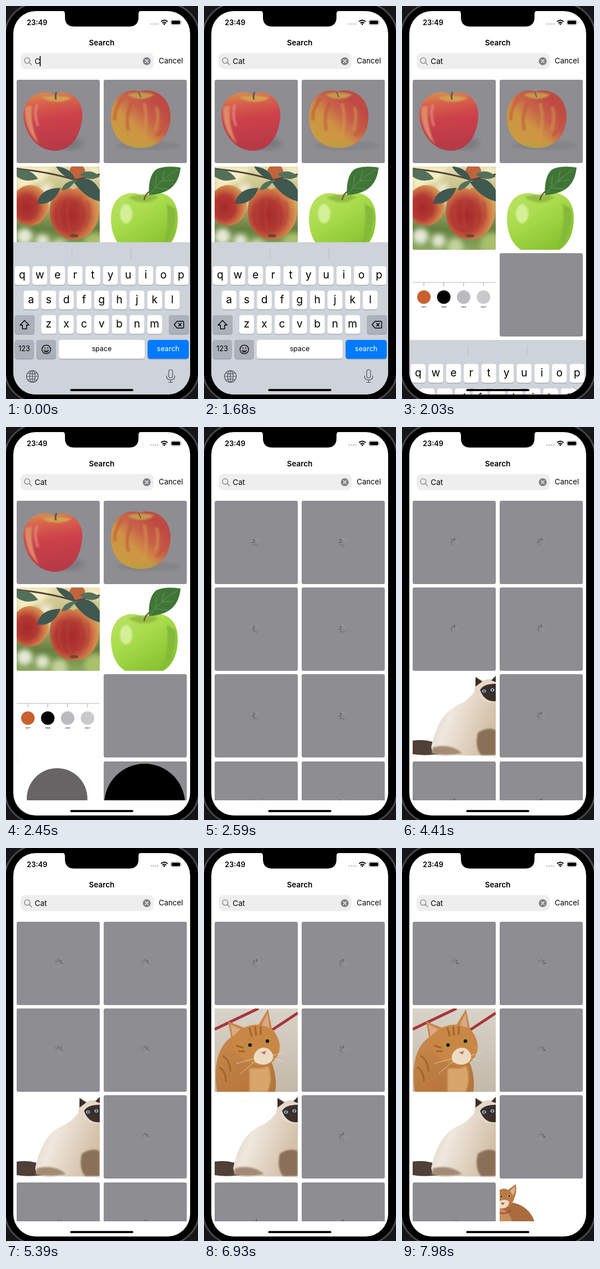
An HTML page that plays this animation: 342x698 px, repeating every 8 s.

```html
<!DOCTYPE html>
<html lang="en">
<head>
<meta charset="utf-8">
<title>Image search</title>
<style>
html, body { margin: 0; width: 100%; height: 100%; overflow: hidden; background: #161618; }
body { position: relative; font-family: Inter, Roboto, sans-serif; }
body > svg, .grid { position: absolute; left: 0; top: 0; }
text { font-family: Inter, Roboto, sans-serif; }
.mid { text-anchor: middle; }

.grid { width: 342px; height: 663px; overflow: hidden; }
.cell { position: absolute; width: 148px; height: 148px; border-radius: 3px; overflow: hidden; background: #8e8d92; }
.cell svg { position: absolute; left: 0; top: 0; }

.spin { position: absolute; left: 64px; top: 64px; width: 20px; height: 20px; clip-path: url(#spokes);
  animation: reload 8s step-end infinite; }
.spin::before { content: ""; position: absolute; inset: 0; border-radius: 50%;
  background: conic-gradient(#5b5b60 0 5%, #9b9b9f 14% 28%, #5b5b60);
  animation: turn 8s linear infinite; }

.old { animation: clear 8s step-end infinite; }
.cat1 { animation: reload1 8s step-end infinite; }
.cat2 { animation: reload2 8s step-end infinite; }
.cat3 { animation: reload3 8s step-end infinite; }
.kb { animation: dismiss 8s infinite; }
.popA { animation: popA 8s step-end infinite; }
.popT { animation: popT 8s step-end infinite; }
.typeA { animation: typeA 8s step-end infinite; }
.typeT { animation: typeT 8s step-end infinite; }
.caret { animation: advance 8s step-end infinite, blink 8s linear infinite; }

@keyframes clear { 0% { opacity: 1 } 31.5%, 100% { opacity: 0 } }
@keyframes reload { 0% { opacity: 0 } 31.5%, 100% { opacity: 1 } }
@keyframes reload1 { 0% { opacity: 0 } 33.25%, 100% { opacity: 1 } }
@keyframes reload2 { 0% { opacity: 0 } 82.25%, 100% { opacity: 1 } }
@keyframes reload3 { 0% { opacity: 0 } 89.25%, 100% { opacity: 1 } }
/* one turn per 840 ms */
@keyframes turn { from { transform: rotate(270deg) } to { transform: rotate(3698.57deg) } }
@keyframes dismiss {
  0% { transform: none }
  23.75% { transform: translateY(0); animation-timing-function: cubic-bezier(.3, .6, .2, 1) }
  30%, 100% { transform: translateY(274px) }
}
@keyframes popA { 0% { opacity: 0 } .875% { opacity: 1 } 3.5%, 100% { opacity: 0 } }
@keyframes popT { 0% { opacity: 0 } 10.5% { opacity: 1 } 12.25%, 100% { opacity: 0 } }
@keyframes typeA { 0% { fill-opacity: 0 } 1.75%, 100% { fill-opacity: 1 } }
@keyframes typeT { 0% { fill-opacity: 0 } 11.375%, 100% { fill-opacity: 1 } }
@keyframes advance {
  0% { transform: translateX(0) }
  1.75% { transform: translateX(7.5px) }
  11.375%, 100% { transform: translateX(12px) }
}
@keyframes blink { 0%, 18.6% { opacity: 1 } 21%, 100% { opacity: 0 } }
</style>
</head>
<body>

<svg width="342" height="698">
  <defs>
    <clipPath id="screen"><rect x="13" y="9" width="315" height="681" rx="40"/></clipPath>
    <clipPath id="spokes"></clipPath>
    <filter id="soft"><feGaussianBlur stdDeviation="5"/></filter>
    <filter id="blend"><feGaussianBlur stdDeviation="1.5"/></filter>
    <linearGradient id="red" x2=".15" y2="1">
      <stop offset="0" stop-color="#d8984e"/><stop offset=".22" stop-color="#d8634c"/>
      <stop offset=".5" stop-color="#cd414a"/><stop offset="1" stop-color="#b63a47"/>
    </linearGradient>
    <linearGradient id="blush" x1=".1" y1=".85" x2=".75" y2=".2">
      <stop offset="0" stop-color="#c99c40"/><stop offset=".4" stop-color="#cf9444"/>
      <stop offset=".7" stop-color="#c76049"/><stop offset="1" stop-color="#bf4a43"/>
    </linearGradient>
    <radialGradient id="ripe" cx=".4" cy=".55" r=".65">
      <stop offset="0" stop-color="#a52a2c"/><stop offset=".45" stop-color="#b23a32"/>
      <stop offset=".75" stop-color="#cf7a48"/><stop offset="1" stop-color="#dcae5c"/>
    </radialGradient>
    <linearGradient id="green" x2=".7" y2="1">
      <stop offset="0" stop-color="#bce268"/><stop offset=".45" stop-color="#a9dc4c"/><stop offset="1" stop-color="#86c22e"/>
    </linearGradient>
    <linearGradient id="orchard" x2="0" y2="1">
      <stop offset="0" stop-color="#e2d9a8"/><stop offset=".45" stop-color="#b3ae70"/>
      <stop offset=".75" stop-color="#64803f"/><stop offset="1" stop-color="#8ba85e"/>
    </linearGradient>
    <linearGradient id="cream" x2="1" y2=".4">
      <stop offset="0" stop-color="#d9c8b4"/><stop offset=".4" stop-color="#efe8de"/><stop offset="1" stop-color="#d3c0a8"/>
    </linearGradient>
    <linearGradient id="ginger" x2=".6" y2="1">
      <stop offset="0" stop-color="#c98a4c"/><stop offset="1" stop-color="#b5753c"/>
    </linearGradient>
    <linearGradient id="wall" x2="0" y2="1">
      <stop offset="0" stop-color="#d8d3c9"/><stop offset="1" stop-color="#c3b8a9"/>
    </linearGradient>
  </defs>
  <rect x="-2" y="-5" width="346" height="709" rx="58" fill="#000" stroke="#47474a" stroke-width="3"/>
  <rect x="13" y="9" width="315" height="681" rx="40" fill="#fff"/>
</svg>

<div class="grid"></div>

<svg width="342" height="698">
  <path d="M98 8h145c-5 0-7 2-7 7v5q0 16.500-17 16.500h-97q-17 0-17-16.500v-5c0-5-2-7-7-7z"/>

  <text x="37" y="33.700" font-size="12.700" font-weight="600">23:49</text>
  <g fill="#bcbcbe">
    <circle cx="258.500" cy="32" r="1.300"/><circle cx="262.500" cy="32" r="1.300"/>
    <circle cx="266.500" cy="32" r="1.300"/><circle cx="270.300" cy="32" r="1.300"/>
  </g>
  <g fill="none" stroke="#000" stroke-width="2">
    <path d="M276.200 27.800q5.800-5.200 11.600 0M278.600 30.400q3.400-2.900 6.800 0"/>
    <path d="M282 34l-2-2.200q2-1.500 4 0z" fill="#000" stroke="none"/>
  </g>
  <rect x="293.500" y="24.700" width="18" height="8.800" rx="2.700" fill="none" stroke="#a5a5a5" stroke-width=".9"/>
  <rect x="294.800" y="26" width="15.400" height="6.200" rx="1.600"/>
  <path d="M312.700 27.500q1.800 1.600 0 3.200z" fill="#a5a5a5"/>

  <text class="mid" x="170.500" y="69.700" font-size="13.400" font-weight="600">Search</text>
  <rect x="26" y="83.500" width="237" height="28.500" rx="8.500" fill="#eeeeef"/>
  <g fill="none" stroke="#808085" stroke-width="1.300" stroke-linecap="round">
    <circle cx="37.800" cy="96.800" r="4.900"/><path d="M41.500 100.500l4 4"/>
  </g>
  <text x="51" y="102.700" font-size="13.600">C<tspan class="typeA">a</tspan><tspan class="typeT">t</tspan></text>
  <rect class="caret" x="60" y="89" width="1.600" height="18"/>
  <circle cx="250.700" cy="98" r="7" fill="#808084"/>
  <path d="M248.200 95.500l5 5m0-5l-5 5" stroke="#fff" stroke-width="1.300" stroke-linecap="round"/>
  <text x="272" y="102.300" font-size="13.200">Cancel</text>

  <g clip-path="url(#screen)">
    <g class="kb">
      <rect x="13" y="419.500" width="315" height="280" fill="#ced2d9"/>
      <path d="M117.500 430v19M222.500 430v19" stroke="#b9bdc5"/>
      <g id="keys"></g>
      <path d="M33 558.500l8 8.200h-4.300v6.800h-7.400v-6.800h-4.300z" fill="none" stroke="#000" stroke-width="1.400" stroke-linejoin="round"/>
      <path d="M299.500 566l5.300-6h10.200q1.500 0 1.500 1.500v9q0 1.500-1.500 1.500h-10.200zM307 563l5.500 6m0-6l-5.500 6" fill="none" stroke="#000" stroke-width="1.400" stroke-linejoin="round"/>
      <g fill="none" stroke="#000" stroke-width="1.300">
        <circle cx="71.800" cy="610" r="7.700"/>
        <path d="M67 611h9.600q-.8 4.200-4.800 4.200t-4.800-4.200z" fill="#000" stroke="none"/>
        <path d="M68.300 612.300h7" stroke="#fff" stroke-width=".9"/>
        <circle cx="69.300" cy="607.500" r=".7" fill="#000" stroke-width=".8"/><circle cx="74.300" cy="607.500" r=".7" fill="#000" stroke-width=".8"/>
      </g>
      <g fill="none" stroke="#50545b" stroke-width="1.200">
        <circle cx="47" cy="658" r="10.500"/><ellipse cx="47" cy="658" rx="5" ry="10.500"/>
        <path d="M47 647.500v21M36.500 658h21M39 651.500q8 4.500 16 0M39 664.500q8-4.500 16 0"/>
        <rect x="289.800" y="646" width="7" height="14.500" rx="3.500"/>
        <path d="M286 656.500v1.500q0 6 7.300 6t7.300-6v-1.500M293.300 664v4.500M289 668.500h8.600"/>
      </g>
      <g id="pops"></g>
    </g>
  </g>
  <rect x="114.300" y="680.200" width="112.500" height="3.800" rx="1.900"/>
</svg>

<script>
const $ = s => document.querySelector(s);

const orchard = `<rect width="148" height="148" fill="url(#orchard)"/>
  <g filter="url(#soft)">
    <path d="M0 0h66l-18 24L0 46zM116 0h32v24z" fill="#f4edc4"/>
    <circle cx="14" cy="124" r="14" fill="#e4ead6"/><circle cx="46" cy="132" r="12" fill="#dfe6cc"/>
    <circle cx="76" cy="142" r="14" fill="#c3d49a"/><circle cx="140" cy="138" r="20" fill="#a9c06c"/>
    <path d="M40 30h24l-8 50z" fill="#efe8cf"/>
  </g>
  <circle cx="108" cy="10" r="14" fill="#c0643c"/>
  <path d="M0 4Q60 10 104 24L148 14" fill="none" stroke="#51453a" stroke-width="3"/>
  <ellipse cx="24" cy="69" rx="33" ry="36" fill="url(#ripe)"/>
  <path d="M101 41C122 26 148 42 147 78C146 110 126 130 102 130C78 130 59 110 59 80C59 46 80 29 101 41z" fill="url(#ripe)"/>
  <path d="M80 60q-10 24 0 48M94 54q-8 30 2 64M112 54q6 30-2 62M126 62q8 22-4 44" fill="none" stroke="#b8423a" stroke-width="5" opacity=".5" filter="url(#blend)"/>
  <ellipse cx="102" cy="123" rx="8" ry="3" fill="#6a4a30"/>
  <path d="M36 66Q42 38 78 38Q66 70 36 66zM102 28Q130 10 148 42V62Q122 56 102 28zM70 0Q98 2 104 24Q82 20 70 0z" fill="#3f5850"/>
  <path d="M0 6Q24 2 38 22Q16 30 0 18zM106 24Q92 44 80 42Q84 26 106 24zM112 14Q132 2 148 18Q130 28 112 14z" fill="#54705a"/>`;

const badges = ["#c9602f", "#000", "#b9bbbe", "#c9cacc"].map((c, i) => {
  const x = 20 + 35.4 * i;
  return `<path d="M${x} 52v7" stroke="#aaa"/><circle cx="${x}" cy="78" r="12" fill="${c}"/>
    <text class="mid" x="${x}" y="96.500" font-size="4">${[1977, 1998, 2001, 2007][i]}</text>`;
}).join("");

const white = `<rect width="148" height="148" fill="#fff"/>`;

const oldPics = [
  `<ellipse cx="92" cy="113" rx="27" ry="11" fill="#7a797d" filter="url(#soft)"/>
   <path d="M68 27C84 15 117 28 117 62C116 95 100 126 68 126C36 126 13 95 12 62C12 28 48 14 68 27z" fill="url(#red)"/>
   <g filter="url(#blend)">
     <path d="M44 31Q70 25 98 32Q86 40 70 39T44 31z" fill="#d2a052"/>
     <path d="M16 48Q12 88 40 114Q24 84 27 46z" fill="#dc8a66"/>
     <path d="M36 44q-6 18 2 38" fill="none" stroke="#e39a8a" stroke-width="5" opacity=".6"/>
   </g>
   <path d="M70 35Q68 28 71 22" fill="none" stroke="#66553c" stroke-width="3"/>`,
  `<ellipse cx="80" cy="117" rx="58" ry="8" fill="#858489" filter="url(#blend)"/>
   <path d="M64 21C90 13 119 30 119 65C119 99 98 121 66 121C34 121 13 100 13 67C13 30 40 13 64 21z" fill="url(#blush)"/>
   <g fill="none" stroke-width="6" filter="url(#blend)" opacity=".55">
     <path d="M34 32q-16 20-14 40M50 40q-12 24-6 50M94 100q16-14 18-34" stroke="#c0503c"/>
     <path d="M72 42q8 30-2 66M94 48q6 20-2 42" stroke="#d29a4c"/>
     <path d="M48 113q20 7 42-1" stroke="#a8a53a"/>
   </g>
   <path d="M42 26Q66 19 90 26Q80 34 66 34T42 26z" fill="#c2984e" filter="url(#blend)"/>
   <path d="M66 31l-4-10" stroke="#7a5a38" stroke-width="2"/>`,
  orchard,
  white + `<path d="M72 54C92 38 133 46 132 92C132 124 118 142 106 148H38C22 138 13 118 13 92C14 46 52 40 72 54z" fill="url(#green)"/>
   <g filter="url(#blend)">
     <path d="M44 55Q72 45 98 54Q86 64 72 64T44 55z" fill="#93bd42"/>
     <path d="M128 76Q132 116 104 146Q118 104 112 66z" fill="#84b93a"/>
     <ellipse cx="40" cy="84" rx="11" ry="17" fill="#d3f096"/>
   </g>
   <path d="M72 60Q73 50 82 44" fill="none" stroke="#6b5a30" stroke-width="2.500"/>
   <path d="M81 51C79 34 83 10 96 4C110-1 124 0 137 2C134 28 122 48 81 51z" fill="#3f7537"/>
   <path d="M81 51Q100 24 132 5M92 36l2-20M104 24l4-16M92 38l22 2M104 26l20-2" fill="none" stroke="#709a5e" stroke-width=".9"/>`,
  white + `<path d="M0 52h148" stroke="#b5b5b5"/>` + badges,
  "",
  white + `<circle cx="72" cy="66" r="54" fill="#686466"/>`,
  `<circle cx="73" cy="76" r="72"/>`
];

const newPics = {
  4: ["cat1", white + `<path d="M0 118Q28 114 48 126L54 141Q22 146 0 142z" fill="#4f3f37"/>
   <path d="M33 130C40 98 52 68 80 55C98 48 106 36 116 24L148 20V143Q84 147 36 140z" fill="url(#cream)"/>
   <path d="M116 104Q136 92 148 100V144H122Q110 130 116 104z" fill="#8b7059" filter="url(#blend)"/>
   <path d="M36 130Q66 122 88 140Q58 147 34 141z" fill="#a48b75" filter="url(#blend)"/>
   <path d="M110 30L112 5L126 11Q136 7 141 10L148 3V50Q126 54 110 30z" fill="#e4d8c8"/>
   <path d="M112 22L112 5L124 13zM140 11L148 3V14zM120 28Q126 17 148 17V48Q128 50 120 28z" fill="#3b2e2b"/>
   <ellipse cx="127" cy="30" rx="3.500" ry="2.800" fill="#8fc0e2"/><ellipse cx="142" cy="28" rx="3.500" ry="2.800" fill="#8fc0e2"/>
   <circle cx="127" cy="30" r="1.300"/><circle cx="142" cy="28" r="1.300"/>`],
  2: ["cat2", `<rect width="148" height="148" fill="url(#wall)"/>
   <path d="M0 37L78 0M92 45L148 8" stroke="#a8353d" stroke-width="5"/>
   <path d="M4 148C-2 108 2 66 34 48L100 92Q112 120 108 148z" fill="url(#ginger)"/>
   <path d="M32 66L24 23L52 34Q66 28 78 29L95 1L102 36Q121 58 114 80Q103 103 80 101Q46 98 32 66z" fill="#c98745"/>
   <path d="M32 50L28 28L46 37zM84 30L94 8L98 34z" fill="#d9a888"/>
   <path d="M62 34l4 16M72 32l2 16M82 32l0 15M38 66l13 4M42 76l12 0M14 84q14 8 14 28M8 104q12 8 12 26" fill="none" stroke="#a4622c" stroke-width="3"/>
   <path d="M76 74Q86 66 96 72Q109 82 101 94Q88 105 72 95Q66 84 76 74z" fill="#eddcc4"/>
   <path d="M62 106Q84 108 96 102Q104 126 94 148H62z" fill="#d8a56a" filter="url(#blend)"/>
   <circle cx="62" cy="65" r="5.500" fill="#b69545"/><circle cx="94" cy="58" r="5.500" fill="#b69545"/>
   <circle cx="63" cy="65" r="3.300" fill="#221a14"/><circle cx="94" cy="58" r="3.300" fill="#221a14"/>
   <path d="M82 78l10-3-3 7z" fill="#c47966"/>
   <path d="M74 88L38 98M75 91L46 116M102 84l22-6M102 88l20 6" stroke="#f1e6d6" stroke-width=".7"/>`],
  7: ["cat3", white + `<path d="M0 42L24 36Q52 42 62 69H0z" fill="#a96c3e"/>
   <path d="M0 46Q16 48 22 69H0z" fill="#c68e5b"/>
   <path d="M0 13Q8 9 15 13L29 3Q31 18 26 28Q22 43 8 46H0z" fill="#b97a46"/>
   <path d="M18 15L27 7Q28 17 24 23z" fill="#dcae90"/>
   <path d="M0 33Q10 28 17 34Q16 45 6 46H0z" fill="#eddac2"/>
   <path d="M2 36h7l-3.500 4z" fill="#9c4f42"/>
   <ellipse cx="3" cy="25" rx="3" ry="2.500" fill="#c9b354"/><ellipse cx="17" cy="24" rx="3.300" ry="2.500" fill="#c9b354"/>
   <circle cx="3" cy="25" r="1.500"/><circle cx="17" cy="24" r="1.500"/>
   <path d="M0 54Q10 58 20 49" fill="none" stroke="#b5403c" stroke-width="2"/>`]
};

const pic = (name, art) => `<svg class="${name}" width="148" height="148">${art}</svg>`;

$("#spokes").innerHTML = Array.from({ length: 8 }, (_, i) =>
  `<rect x="9" y="2" width="2" height="4.800" rx="1" transform="rotate(${i * 45} 10 10)"/>`).join("");

$(".grid").innerHTML = oldPics.map((art, i) => {
  const x = 19.4 + 154.3 * (i % 2), y = 130.9 + 154.2 * (i >> 1);
  return `<div class="cell" style="left:${x}px;top:${y}px"><div class="spin"></div>` +
    pic("old", art) + (newPics[i] ? pic(...newPics[i]) : "") + "</div>";
}).join("");

const key = (x, y, w, fill, label = "", size = 19, color = "#000") =>
  `<rect x="${x}" y="${y + 1}" width="${w}" height="33.500" rx="4.500" fill="#8f9297"/>
   <rect x="${x}" y="${y}" width="${w}" height="33.500" rx="4.500" fill="${fill}"/>
   <text class="mid" x="${x + w / 2}" y="${y + (size > 15 ? 22.3 : 20.3)}" font-size="${size}" fill="${color}">${label}</text>`;

const row = (letters, cx, y) => [...letters].map((c, i) =>
  key(cx + 31.45 * i - 13.3, y, 26.6, "#fff", c)).join("");

const dark = "#abb0ba";
$("#keys").innerHTML =
  row("qwertyuiop", 28.8, 462) + row("asdfghjkl", 44.6, 505.5) + row("zxcvbnm", 76, 549) +
  key(15.5, 549, 35.5, dark) + key(290, 549, 36, dark) +
  key(15.5, 593, 34, dark, "123", 12.5) + key(54, 593, 35, dark) +
  key(94, 593, 153, "#fff", "space", 12.3) + key(252.3, 593, 73.2, "#007aff", "search", 12.5, "#fff");

const callout = (name, letter, x, y) => `<g class="${name}"><g transform="translate(${x} ${y})">
  <path d="M-13.300 30V8C-13.300-2-26-2-26-14V-42q0-8 8-8H18q8 0 8 8V-14C26-2 13.300-2 13.300 8V30q0 4-4 4h-18.600q-4 0-4-4z"
    fill="#fff" stroke="#b4b8bf" stroke-width=".6"/>
  <text class="mid" y="-15" font-size="29">${letter}</text></g></g>`;

$("#pops").innerHTML = callout("popA", "a", 44.6, 505.5) + callout("popT", "t", 154.6, 462);
</script>
</body>
</html>
```
